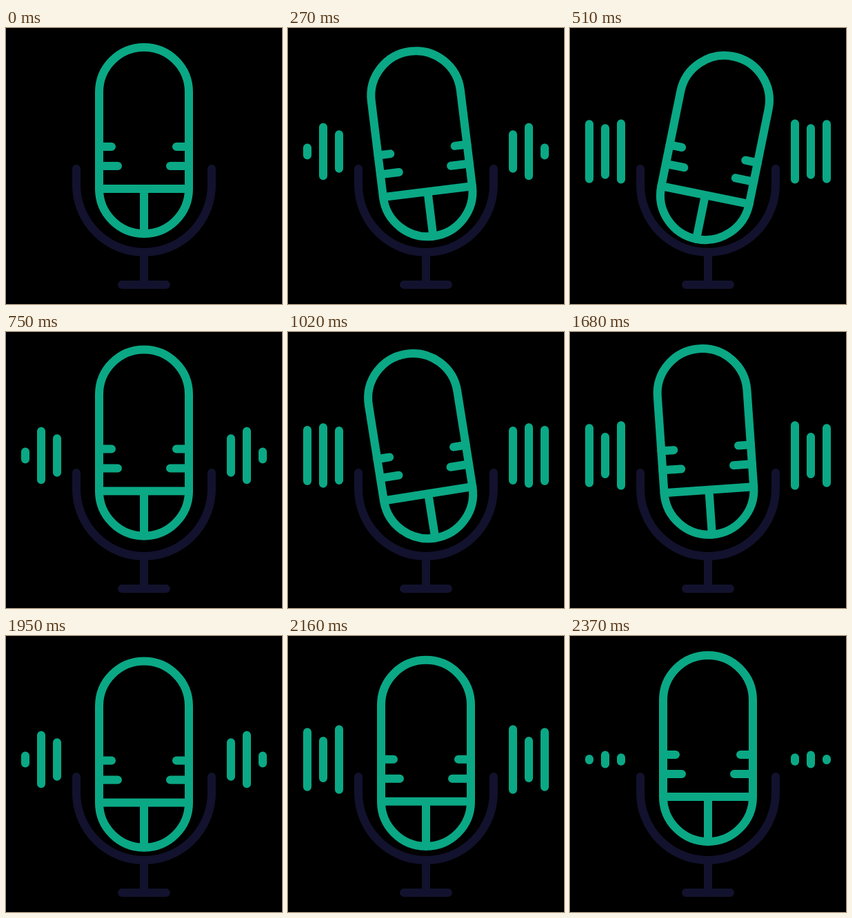
Recreate the animation shown at these times as an HTML page. Size 400 by 400 pixels, loop 2400 ms.

```html
<!DOCTYPE html>
<html lang="en">
<head>
<meta charset="utf-8">
<title>Microphone</title>
<style>
  html, body { margin: 0; height: 100%; overflow: hidden; background: #000; }
  svg { display: block; width: 100vw; height: 100vh; }
  path, rect { fill: none; stroke: #0ba885; stroke-width: 12; stroke-linecap: round; stroke-linejoin: round; }
  .stand { stroke: #12122e; }
</style>
</head>
<body>
<svg viewBox="0 0 400 400">
  <path class="stand" d="M102 204V227A98 98 0 0 0 298 227V204M200 325V372M168 372H232"/>
  <g id="mic">
    <rect x="135" y="28" width="130" height="270" rx="65"/>
    <path d="M135 172H153M135 200H162M265 172H247M265 200H238M135 233H265M200 233V298"/>
  </g>
  <path id="waves"/>
</svg>
<script>
const LOOP = 2400, STEP = 30;
const SWAY = 800, PULSE = 480;
const mic = document.getElementById('mic');
const waves = document.getElementById('waves');

const bars = [
  { x: 28, mean: 57, swing: 35, peak: 15 },
  { x: 51, mean: 81, swing: 36, peak: 153 },
  { x: 74, mean: 77, swing: 26, peak: 440 }
];

// Cosine of the given period that peaks at the given time.
const wave = (t, period, peak) => Math.cos(2 * Math.PI * (t - peak) / period);

// Eases from 0 to 1 at the start of a span and back to 0 at its end.
function fade(t, span, ramp) {
  const u = Math.min(1, t / ramp, (span - t) / ramp);
  return u * u * (3 - 2 * u);
}

function drawMic(t) {
  const strength = fade(t, LOOP, 300);
  const settle = Math.max(0, 1 - (t / 1970) ** 3);
  const lift = strength * (3 + 7.5 * wave(t, SWAY, 445));
  const tilt = strength * settle * 12.3 * wave(t, SWAY, 550);
  mic.setAttribute('transform', `translate(0 ${lift}) rotate(${tilt} 200 213)`);
}

function drawWaves(t) {
  const strength = fade(t, LOOP / 2, 130);
  let d = '';
  if (strength > 0) for (const { x, mean, swing, peak } of bars) {
    const length = 0.1 + strength * (mean - 12 + swing * wave(t, PULSE, peak));
    for (const cx of [x, 400 - x]) d += `M${cx} ${179 - length / 2}v${length}`;
  }
  waves.setAttribute('d', d);
}

const start = performance.now();
function tick() {
  const elapsed = (performance.now() - start) % LOOP;
  const t = Math.floor(elapsed / STEP) * STEP;
  drawMic(t);
  drawWaves(t % (LOOP / 2));
  requestAnimationFrame(tick);
}
tick();
</script>
</body>
</html>
```
